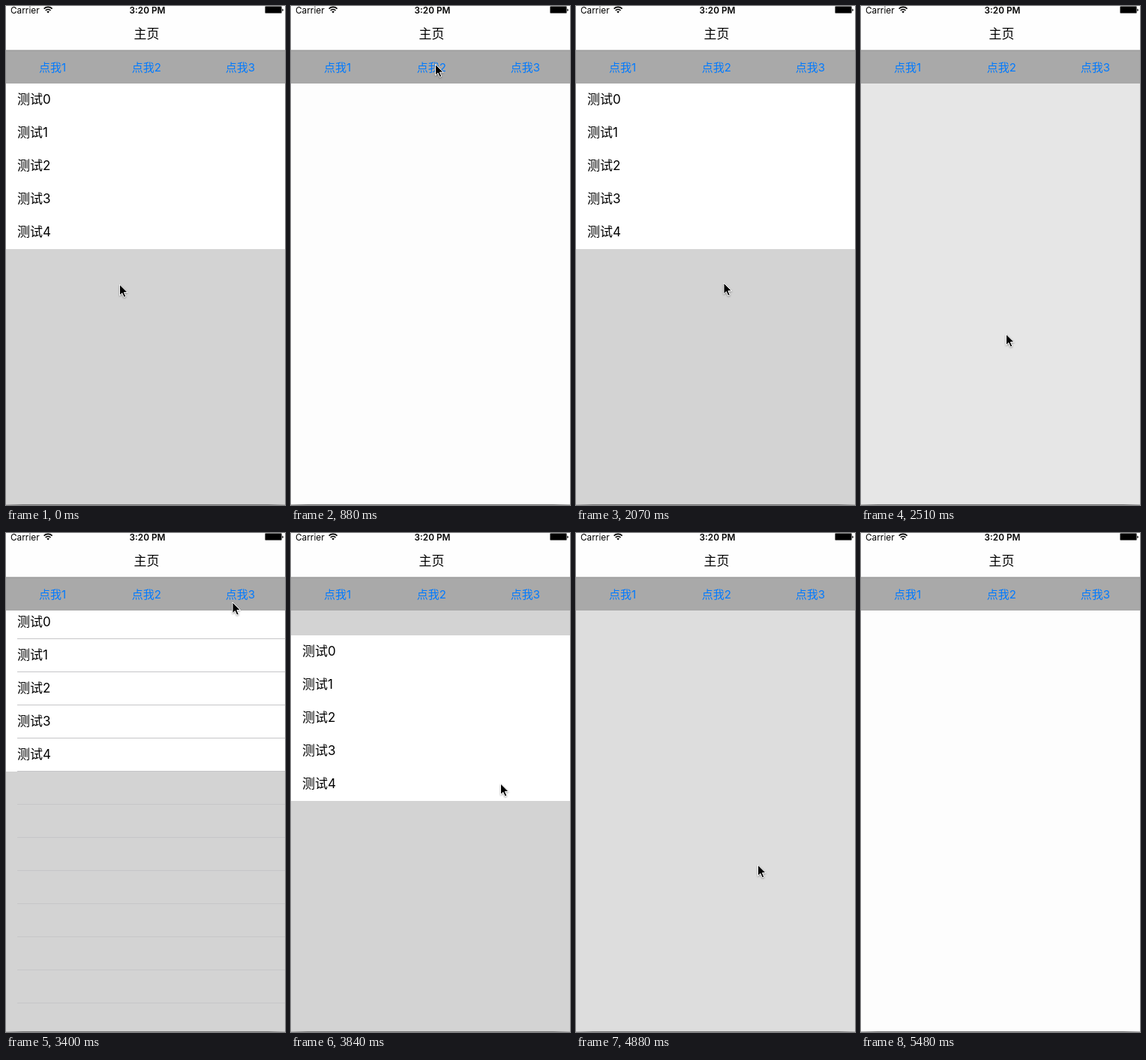
These frames come from a looping animation (372 px wide and 663 px high, 5.63 s). An HTML page:

```html
<!DOCTYPE html>
<html lang="zh-CN">
<head>
<meta charset="utf-8">
<title>主页</title>
<style>
  html, body { margin: 0; width: 100%; height: 100%; overflow: hidden; background: #fdfdfd; }
  svg { display: block; width: 372px; height: 663px; font-family: Inter, "Noto Sans CJK SC", "Noto Sans CJK", sans-serif; }
  .status { font-size: 11.8px; }
  .title { font-size: 16.9px; font-weight: 500; text-anchor: middle; }
  .tab { font-size: 15px; fill: #007aff; text-anchor: middle; }
  .cell { font-size: 17px; }
</style>
</head>
<body>
<svg viewBox="0 0 372 663">
  <defs>
    <clipPath id="below"><rect y="103" width="372" height="560"/></clipPath>
    <linearGradient id="edge">
      <stop offset="0" stop-color="#b4b4b4"/>
      <stop offset=".06" stop-color="#777"/>
      <stop offset=".94" stop-color="#777"/>
      <stop offset="1" stop-color="#b4b4b4"/>
    </linearGradient>
  </defs>

  <rect width="372" height="663" fill="#fdfdfd"/>
  <rect id="shade" y="103" width="372" height="560" fill="#d3d3d3"/>
  <g clip-path="url(#below)">
    <g id="list">
      <rect y="103" width="372" height="220" fill="#fff"/>
      <g id="cells"></g>
      <path id="lines" stroke="#c6c6c8" fill="none"/>
    </g>
  </g>
  <rect y="662" width="372" height="1" fill="url(#edge)"/>

  <rect width="372" height="59" fill="#fefefe"/>
  <rect y="59" width="372" height="44" fill="#a9a9a9"/>
  <rect y="58.5" width="372" height="1" fill="#8e8e8e"/>

  <text class="status" x="6" y="9.6">Carrier</text>
  <g fill="none" stroke="#000" stroke-width="1.7">
    <path d="M50.6 3.6a8 8 0 0 1 11 0M52.7 6a5 5 0 0 1 6.8 0"/>
    <path d="M54.3 7.6a2.6 2.6 0 0 1 3.6 0L56.1 9.6z" fill="#000" stroke="none"/>
  </g>
  <text class="status" x="188.5" y="9.6" font-weight="600" text-anchor="middle">3:20 PM</text>
  <rect x="345.5" y="0.5" width="22" height="9" rx="1" stroke="#777"/>
  <path d="M368.3 3.4q1.4 .4 1.4 1.8t-1.4 1.8z"/>
  <text class="title" x="187.5" y="43">主页</text>
  <g id="tabs"></g>

  <path id="cursor" d="M0 0V14.6L3.4 11.5L5.8 17L8.3 15.9L5.9 10.6H10.6Z" stroke="#fff"
    style="filter:drop-shadow(0 1px 1px rgba(0,0,0,.35))"/>
</svg>
<script>
const LOOP = 5630, STEP = LOOP / 38, LEAD = 14;
const FADE_IN = 300, DROP = 450, FADE_OUT = 450;

// Times in ms: each menu opens, may be pulled down, and closes.
const MENUS = [
  { open: -900, close: 10 },
  { open: 881, close: 2290, pull: { from: 1760, to: 2060, by: 64 } },
  { open: 2780, close: 4720, pull: { from: 3690, to: 4430, by: 56 } },
];
const HOME = { x: 151.5, y: 370 };
const MOVES = [
  { from: 20, to: 430, x: 188, y: 62 },
  { from: 600, to: 720, x: 192.5, y: 77.5 },
  { from: 1650, to: 2060, x: 197, y: 368 },
  { from: 2300, to: 2500, x: 193.5, y: 436 },
  { from: 2510, to: 2900, x: 302, y: 92 },
  { from: 3450, to: 3830, x: 279.5, y: 333 },
  { from: 3840, to: 4430, x: 242.5, y: 441 },
  { from: 4880, to: 5170, x: 334, y: 645 },
];
const POINTER_GONE = 5400;

const $ = id => document.getElementById(id);
const part = (t, from, to) => Math.min(1, Math.max(0, (t - from) / (to - from)));
const ease = p => (1 - Math.cos(Math.PI * p)) / 2;
const show = (el, on) => el.setAttribute('visibility', on ? 'visible' : 'hidden');
const place = (el, x, y) => el.setAttribute('transform', `translate(${x} ${y})`);

const text = (kind, x, y, s) => `<text class="${kind}" x="${x}" y="${y}">${s}</text>`;
const repeat = (n, make) => Array.from({ length: n }, (_, i) => make(i)).join('');
$('tabs').innerHTML = repeat(3, i => text('tab', 62 + 125.25 * i, 86.6, '点我' + (i + 1)));
$('cells').innerHTML = repeat(5, i => text('cell', 15, 130.4 + 44 * i, '测试' + i));
$('lines').setAttribute('d', repeat(13, i => `M15 ${146.5 + 44 * i}H372`));

function drawMenu(t) {
  const { open, close, pull } = MENUS.findLast(m => t >= m.open);
  const dropAt = open + FADE_IN;
  const drop = part(t, dropAt, dropAt + DROP);
  const bump = pull ? pull.by * Math.sin(Math.PI * part(t, pull.from, pull.to)) : 0;
  const dim = ease(part(t, open, dropAt)) - ease(part(t, close, close + FADE_OUT));
  const listOn = drop > 0 && t < close;
  $('shade').setAttribute('opacity', dim);
  place($('list'), 0, Math.round(bump - 220 * (1 - drop) ** 3));
  show($('list'), listOn);
  show($('lines'), listOn && drop < 1);
}

function drawPointer(t) {
  let { x, y } = HOME;
  for (const m of MOVES) {
    const p = ease(part(t, m.from, m.to));
    x += (m.x - x) * p;
    y += (m.y - y) * p;
  }
  place($('cursor'), x, y);
  show($('cursor'), t < POINTER_GONE);
}

const start = performance.now();
function draw(now) {
  const ms = Math.max(0, now - start) % LOOP;
  const t = Math.max(0, Math.floor((ms + LEAD) / STEP) * STEP - LEAD);
  drawMenu(t);
  drawPointer(t);
  requestAnimationFrame(draw);
}
draw(start);
</script>
</body>
</html>
```
